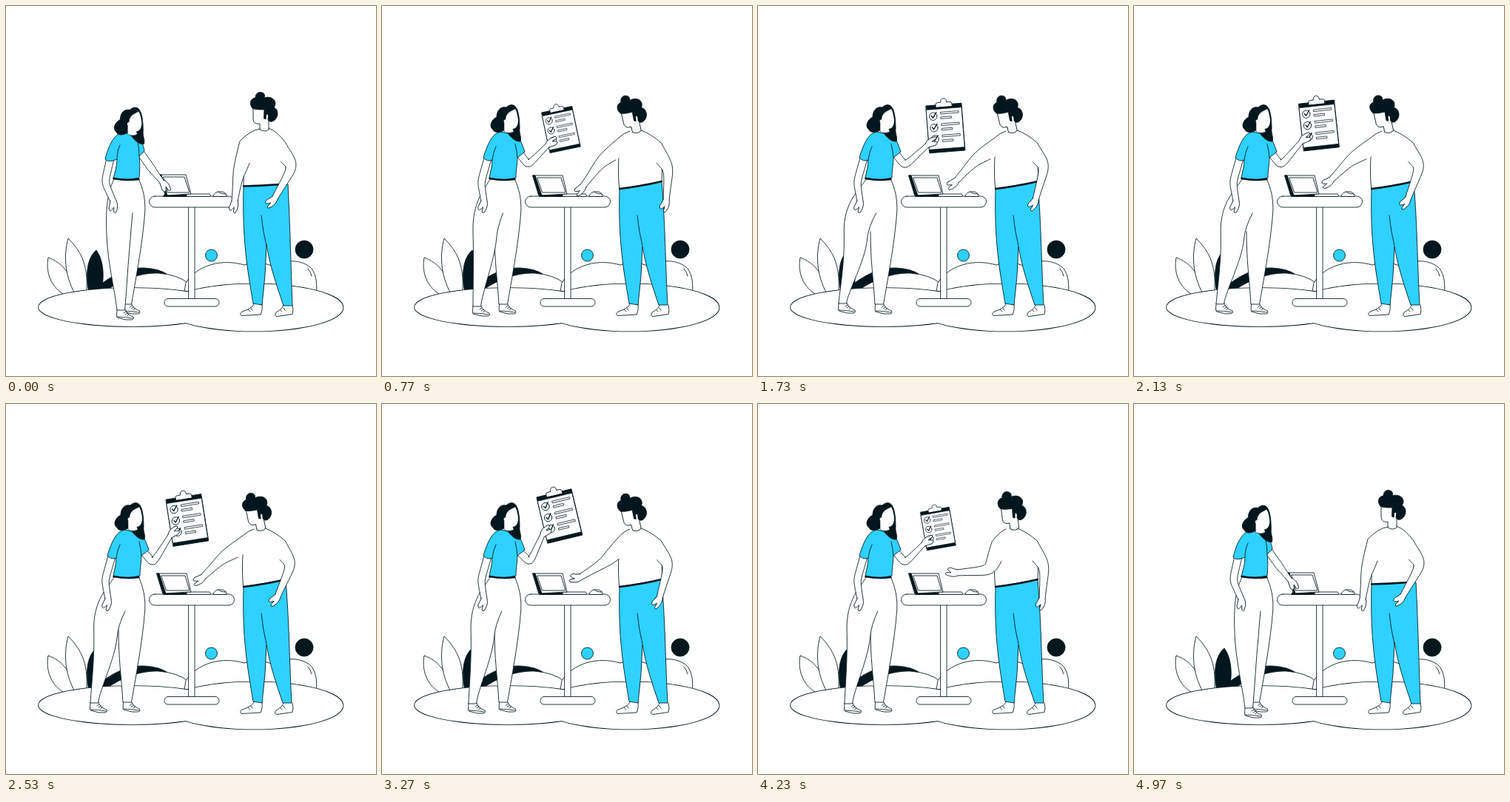
An HTML page with a canvas that plays this animation: 500 px wide and 500 px high, repeating every 5 s.

```html
<!DOCTYPE html>
<html lang="en">
<head>
<meta charset="utf-8">
<title>Standing desk meeting</title>
<style>
html, body { margin: 0; width: 100%; height: 100%; overflow: hidden; background: #fff; }
canvas { display: block; }
</style>
</head>
<body>
<canvas id="stage" width="500" height="500"></canvas>
<script>
const ctx = document.getElementById('stage').getContext('2d');
const INK = '#01161d', CYAN = '#2ed1ff', WHITE = '#fff';
const LOOP = 5;

// Key times in seconds; every track returns to its first pose.
const TIMES = [0, .77, 1.73, 2.53, 3.27, 4.23, 4.97];
const loop = rows => [...rows, rows[0]];

// Arms: shoulder x y, elbow x y, wrist x y, hand angle.
const womanReach = loop([
  [182, 199, 197, 220, 211, 238, 50],
  [187, 201, 198, 214, 224, 188, -40],
  [187, 201, 199, 215, 229, 188, -38],
  [187, 201, 199, 214, 222, 178, -50],
  [187, 201, 200, 213, 217, 177, -52],
  [187, 201, 199, 214, 224, 189, -40]]);
const manReach = loop([
  [327, 186, 314, 228, 309, 264, 95],
  [327, 187, 296, 211, 272, 243, 125],
  [327, 187, 294, 208, 268, 236, 135],
  [327, 187, 293, 208, 266, 234, 140],
  [327, 189, 302, 213, 268, 234, 165],
  [327, 190, 313, 224, 269, 228, 180]]);
const manRest = loop([
  [368, 190, 387, 217, 363, 260, 130],
  [368, 191, 387, 220, 384, 263, 103],
  [368, 191, 387, 217, 375, 262, 115],
  [368, 191, 385, 217, 367, 260, 127],
  [368, 191, 387, 217, 375, 262, 115],
  [368, 191, 387, 220, 384, 263, 103]]);
const womanRest = [[141, 206, 134, 238, 145, 264, 85], [143, 206, 134, 238, 138, 264, 100]];

const step = loop([[150, 411], [123, 406], [109, 402], [114, 404], [117, 405], [117, 405]]);
const board = loop([[230, 232, -22], [242, 167, -12], [253.5, 165, -4.5],
  [245, 157, -9], [240, 151.5, -13.5], [243.5, 168.5, -10]]);
const lean = loop([[0], [1], [1], [.88], [1], [.5]]);
const turn = loop([[0], [1], [1], [1], [1], [1]]);
const SHOW_TIMES = [.3, .77, 1.1, 4, 4.23, 4.65];
const show = [[0], [.87], [1], [1], [.82], [0]];

// Monotone cubic interpolation through the rows.
function at(rows, t, times = TIMES) {
  const last = times.length - 1;
  t = Math.min(Math.max(t, times[0]), times[last]);
  let i = 0;
  while (i < last - 1 && t > times[i + 1]) i++;
  const h = times[i + 1] - times[i], u = (t - times[i]) / h;
  return rows[0].map((_, c) => {
    const slope = k => (rows[k + 1][c] - rows[k][c]) / (times[k + 1] - times[k]);
    const tangent = k => {
      if (k === 0 || k === last) return 0;
      const a = slope(k - 1), b = slope(k);
      return a * b <= 0 ? 0 : 2 * a * b / (a + b);
    };
    const p = rows[i][c], q = rows[i + 1][c], v = 1 - u;
    return v * v * (1 + 2 * u) * p + u * u * (3 - 2 * u) * q
      + h * u * v * (v * tangent(i) - u * tangent(i + 1));
  });
}

const lerp = (a, b, u) => a + (b - a) * u;

// Blends two path strings that share the same commands.
function mix(a, b, u) {
  const ends = b.match(/-?[\d.]+/g);
  let i = 0;
  return a.replace(/-?[\d.]+/g, n => lerp(+n, +ends[i++], u).toFixed(2));
}

function draw(d, fill, width = .85) {
  const p = new Path2D(d);
  if (fill) { ctx.fillStyle = fill; ctx.fill(p); }
  if (width) { ctx.lineWidth = width; ctx.stroke(p); }
}

function rounded(x, y, w, h, r) {
  ctx.beginPath();
  ctx.roundRect(x, y, w, h, r);
  ctx.fillStyle = WHITE;
  ctx.fill();
  ctx.lineWidth = .85;
  ctx.stroke();
}

function disc(x, y, r, fill) {
  ctx.beginPath();
  ctx.arc(x, y, r, 0, 7);
  ctx.fillStyle = fill;
  ctx.fill();
  ctx.lineWidth = .85;
  ctx.stroke();
}

function placed(x, y, degrees, scale, paint) {
  ctx.save();
  ctx.translate(x, y);
  ctx.rotate(degrees * Math.PI / 180);
  ctx.scale(scale, scale);
  paint();
  ctx.restore();
}

// A tapered arm along a curve, open at the shoulder and ending in a hand.
function arm([sx, sy, ex, ey, wx, wy, angle], [w0, w1, w2], neck) {
  const k = 1.2, left = [], right = [];
  const ax = lerp(sx, ex, k), ay = lerp(sy, ey, k), bx = lerp(wx, ex, k), by = lerp(wy, ey, k);
  for (let i = 0; i <= 20; i++) {
    const u = i / 20, v = 1 - u;
    const pos = (s, a, b, w) => v * v * v * s + 3 * v * v * u * a + 3 * v * u * u * b + u * u * u * w;
    const vel = (s, a, b, w) => v * v * (a - s) + 2 * u * v * (b - a) + u * u * (w - b);
    const x = pos(sx, ax, bx, wx), y = pos(sy, ay, by, wy);
    const dx = vel(sx, ax, bx, wx), dy = vel(sy, ay, by, wy), len = Math.hypot(dx, dy);
    const w = u < .5 ? lerp(w0, w1, u * 2) : lerp(w1, w2, u * 2 - 1);
    left.push([x - dy / len * w, y + dx / len * w]);
    right.push([x + dy / len * w, y - dx / len * w]);
  }
  const line = pts => pts.map(p => p.map(n => n.toFixed(2)).join()).join('L');
  const [outer, inner] = neck && neck.side === 'left' ? [left, right] : [right, left];
  draw('M' + line([...outer, ...inner.slice().reverse()]), WHITE, 0);
  const start = neck ? `M${neck.x},${neck.y}Q${neck.cx},${neck.cy} ` : 'M';
  draw(start + line(outer));
  draw('M' + line(inner.slice(neck ? 4 : 0)));
  placed(wx, wy, angle, 1, () => draw(
    `M-1,${-w2}C4,-6 9,-5.5 15,-2.5Q17,-.5 14,.5L8,0C10,2 14,4 12,6Q9,8 5,5.5L-1,${w2}`, WHITE));
}

function scenery() {
  draw('M86,394C62,384 53,362 57,340C75,346 90,362 95,394', WHITE);
  draw('M96,394C80,368 77,340 84,314C102,332 113,352 108,394', WHITE);
  draw('M113,392C106,362 110,340 122,330C133,345 133,368 128,392Z', INK);
  draw('M112,390C135,368 160,353 187,354Q206,355 217,362C220,367 190,380 130,392Z', INK);
  draw('M128,390C150,372 180,360 206,361Q232,363 247,375L247,392Z', WHITE);
  draw('M240,392L243,374C258,350 292,341 322,350Q340,343 362,352C380,340 404,344 414,356Q422,368 419,392', WHITE);
  draw('M408,355Q412,359 413,365');
  disc(277.5, 337, 8, CYAN);
  disc(403, 329, 12, INK);

  const ground = new Path2D();
  ground.ellipse(170, 407, 126, 26, 0, 0, 7);
  ground.closePath();
  ground.ellipse(335, 407.5, 120.5, 32, 0, 0, 7);
  ctx.lineWidth = 1.7;
  ctx.stroke(ground);
  ctx.fillStyle = WHITE;
  ctx.fill(ground);
}

function desk(u) {
  rounded(247, 266, 8, 130, 0);
  rounded(214, 395.5, 74, 10.5, 5);
  rounded(193.5, 257, 115, 15, 7.5);
  draw('M213,257L215,254L275,254Q277,255 276,257Z', WHITE);
  draw('M213,257L214,255L244,255L244,257Z', INK);
  draw(mix('M208,228L243,228L250,254L216,256Z', 'M204,229L244,229L250,254L213,256Z', u), WHITE);
  draw(mix('M208,228L210,228L218,256L216,256Z', 'M204,229L207,229L216,256L212,256Z', u), INK);
  draw(mix('M213,231L241,231L248,252L219,252Z', 'M210,232L242,232L248,252L217,252Z', u), WHITE);
  draw('M280,257C281,252 287,250 292,251Q298,252 298,257Z', WHITE);
  draw('M287,251Q290,254 297,254');
}

function clipboard() {
  draw('M-24,-32H24V32H-24Z', INK);
  draw('M-24,-26.5H23.5V27.5H-24Z', WHITE, .6);
  draw('M-11,-29V-33Q-11,-35 -8,-35H-4C-5,-42 5,-42 4,-35H8Q11,-35 11,-33V-29Z', WHITE);
  for (const y of [-17, -1.5, 14]) {
    disc(-15.5, y, 5.2, WHITE);
    draw(`M-18,${y - 1}L-16,${y + 2}L-11,${y - 5}`, null, 1.3);
    draw(`M-5,${y - 5}H19V${y - 2.5}H-5Z`, WHITE, .7);
    draw(`M-5,${y + 1.5}H9V${y + 4}H-5Z`, WHITE, .7);
  }
}

function womanShoe(x, y) {
  placed(x, y, 0, 1, () => {
    draw('M0,-1L-.5,8Q0,11 4,11Q12,14 20,13Q24,12 22,9C17,7 13,5 11,-1', WHITE);
    draw('M9,4L12,2M11,6L14,4M14,8L16,5M0,9Q10,9 21,11', null, .8);
  });
}

function woman(t, u) {
  const [x, y] = at(step, t), back = 150 - x;
  const knee = 136 - back * .48, mid = 168 - back * .5, crease = 171 - back * .28;
  womanShoe(158.5, 403);
  draw('M146,234L179,233C185,247 190,262 187,287C184,322 175,372 169.5,403L158,403C156,370 152,345 152,305', WHITE);
  womanShoe(x, y);
  draw(`M146,234C140,246 ${knee - 2},264 ${knee},308C${knee + 1},345 ${lerp(knee, x, .8)},385 ${x},${y}`
    + `L${x + 10.5},${y}C${x + 13},385 ${mid - 3},345 ${mid},316Q${mid + 1},300 ${crease},280`, WHITE);

  const [cx, cy, tilt] = at(board, t), [size] = at(show, t, SHOW_TIMES);
  if (size > .01) placed(cx, cy, tilt, size, clipboard);

  arm(at(womanReach, t), [5, 5, 3.2]);
  arm(womanRest[0].map((n, i) => lerp(n, womanRest[1][i], u)), [5, 4.8, 4]);
  draw(mix(
    'M160,171C150,170 140,182 134,207C138,211 143,210 150,207C150,217 147,225 145,233Q162,236 180,232C181,222 181,210 180,203L187,196C186,189 183,180 177,171Q170,174 160,171Z',
    'M162,170C150,170 143,185 137,205C141,209 146,210 149,208C149,217 146,225 145,233Q162,237 181,232C181,222 183,212 183,205L193,197C190,188 186,178 180,171Q171,174 162,170Z', u), CYAN);
  draw(mix('M150,207Q150,196 154,188M180,203Q180,192 178,184',
    'M149,208Q150,198 154,190M183,205Q182,194 180,186', u));
  draw('M145.5,233Q162,236.5 179.5,234', null, 2.4);

  placed(lerp(-.7, 0, u), lerp(3.5, 0, u), 0, 1, () => {
    draw('M181,137C178,132 172,133 168,137C160,135 155,142 155,150C146,155 145,164 150,167C151,171 158,172 164,168L170,172C174,177 180,184 187,183C189,177 185,173 186,165C186,155 185,142 181,137Z', INK);
    draw('M176,141C169,144 167,149 167,153Q163,154 165,158L165,170Q172,173 178,170L177,166C182,166 185,160 184,152C183,145 182,142 180,139Z', WHITE, .5);
  });
}

function man(t, u) {
  draw('M335,402C334,408 325,411 319,413Q315,416 318,418.5L344,417Q347,411 346,403', WHITE);
  draw('M375,403C374,410 368,412 365,414Q362,418 366,419.5L387,416.5Q389,411 387,404', WHITE);
  draw('M327,410L330,413M331,408L333,411M370,410L373,413M375,408L377,411', null, .8);
  draw(mix(
    'M321,243L381,241C384,300 385,350 387,405L375,405C366,378 356,350 352,322Q351,365 346,404L334,402C326,355 319,315 321,243Z',
    'M321,247L378,237C383,300 383,350 386,404L374,404C365,378 356,350 352,325Q351,365 346,404L334,402C326,355 319,315 321,247Z', u), CYAN);
  draw('M345,283Q347,305 352,324');

  draw(mix(
    'M334,167C325,175 321,192 321,243L378,241L379,205C378,188 368,172 355,165Z',
    'M331,171C322,178 318,195 320,246L378,237L379,205C376,185 362,172 350,168Z', u), WHITE, 0);
  draw(mix('M322,205Q321,222 321,243', 'M321,196Q318,215 320.5,246', u));
  draw(mix('M378,217Q380,228 377,241', 'M378,215Q379,225 378,237', u));
  draw(mix('M321,243.5Q345,243 371,241', 'M321,247Q348,244 378,237', u), null, 2.4);

  const [l] = at(lean, t);
  placed(347 - 5 * l, 165 + 3 * l, -13 * l, 1, () => {
    ctx.translate(-347, -165);
    draw('M334,136L334,152C334,158 338,160 343,159L343,167Q350,171 355,167L355,150L352,137', WHITE);
    draw('M333,138C329,134 329,125 337,124C337,118 342,115 346,117C350,118 350,122 349,124C355,122 363,124 364,131Q364,135 362,137C369,140 369,152 360,156C356,157 354,155 354,152C356,147 353,144 351.5,148L351,153L348.5,152L349,140C342,140 336,140 333,138Z', INK);
  });

  arm(at(manReach, t), [11.5, 7.5, 4], {
    side: 'right' === 'left' ? 'right' : 'left',
    x: lerp(343, 335, u), y: lerp(166, 169, u), cx: lerp(330, 328, u), cy: lerp(168, 171, u)
  });
  const rest = at(manRest, t);
  arm(rest, [11, 6.8, 4], {
    side: 'right',
    x: lerp(355, 350, u), y: lerp(165, 168, u), cx: lerp(367, 364, u), cy: lerp(170, 173, u)
  });
}

function frame(now) {
  const t = now / 1000 % LOOP, [u] = at(turn, t);
  ctx.fillStyle = WHITE;
  ctx.fillRect(0, 0, 500, 500);
  ctx.strokeStyle = INK;
  ctx.lineJoin = ctx.lineCap = 'round';
  scenery();
  desk(u);
  woman(t, u);
  man(t, u);
  requestAnimationFrame(frame);
}
requestAnimationFrame(frame);
</script>
</body>
</html>
```
